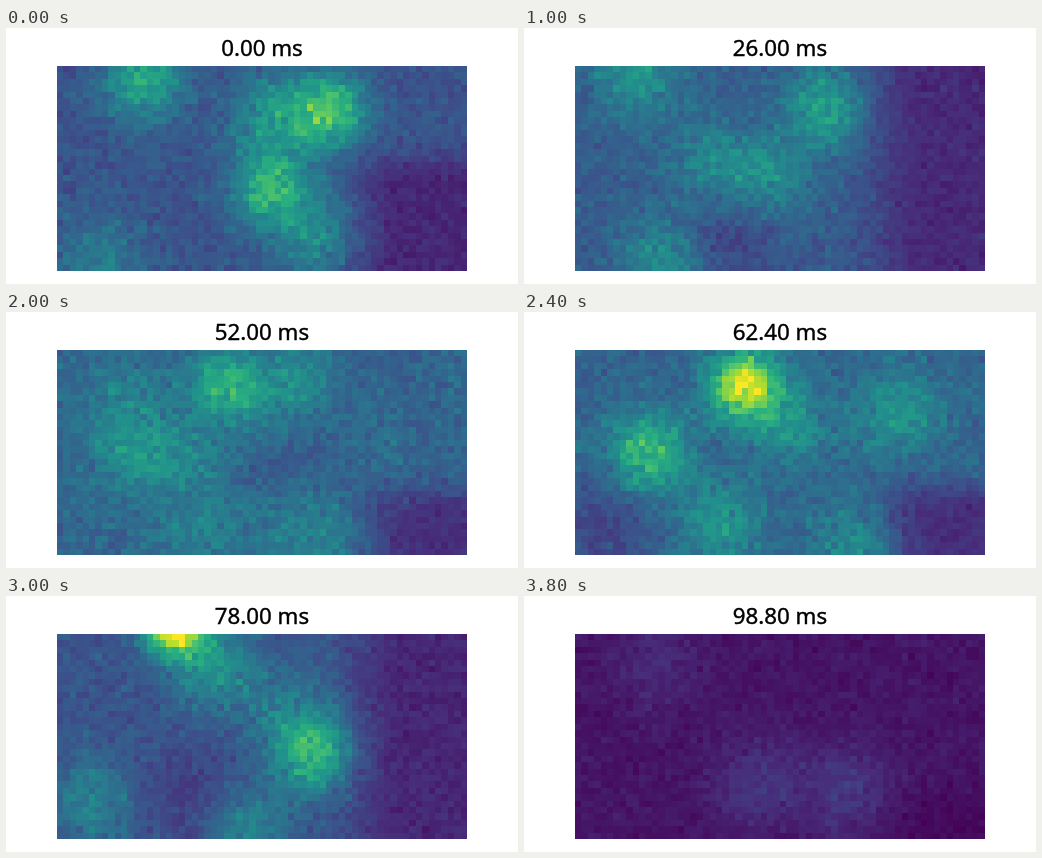
These frames come from a looping animation (512x256 px, 4000 ms). An HTML page with a canvas:

```html
<!DOCTYPE html>
<html lang="en">
<head>
<meta charset="utf-8">
<title>Activity map</title>
<style>
  html, body { margin: 0; width: 100%; height: 100%; overflow: hidden; background: #fff; }
  svg { position: absolute; left: 0; top: 0; }
  text {
    font: 22.3px "Noto Sans", "Open Sans", sans-serif; text-anchor: middle;
    fill: #000; stroke: #000; stroke-width: .4px;
  }
  canvas {
    position: absolute; left: 51px; top: 38px;
    width: 410px; height: 205px; image-rendering: pixelated;
  }
</style>
</head>
<body>
<svg width="512" height="256"><text id="label" x="256" y="28">0.00 ms</text></svg>
<canvas id="map" width="64" height="32"></canvas>
<script>
const COLS = 64, ROWS = 32, STEPS = 20, STEP_MS = 200, UNIT = 5.2;
const STOPS = ['440154', '472d7b', '3b528b', '2c728e', '21918c', '28ae80', '5ec962', 'addc30', 'fde725']
  .map(h => [0, 2, 4].map(i => parseInt(h.slice(i, i + 2), 16)));

const clamp = v => Math.max(0, Math.min(1, v));
const ramp = (v, from, to) => {
  const t = clamp((v - from) / (to - from));
  return t * t * (3 - 2 * t);
};

// A spot fades out around its centre; brighter spots are tighter.
const spot = (x, y, gain) => {
  const r = 5 - 2 * gain;
  return (cx, cy) => gain * Math.exp(-((cx - x) ** 2 + (cy - y) ** 2) / (2 * r * r));
};

// An even level, dimmed on the right below the row `top`, with spots on it.
const pose = (step, level, top, ...spots) => ({
  step,
  at: (x, y) => level * (1 - .6 * ramp(x, 40, 54) * ramp(y, top, top + 8))
    + spots.reduce((sum, s) => sum + s(x, y), 0)
});

const poses = [
  pose(0, .26, 10, spot(13, 2, .32), spot(33, 7, .24), spot(42, 6.5, .44),
    spot(33, 18.5, .4), spot(40, 26, .2), spot(6, 30, .16)),
  pose(2, .27, 15, spot(20, 3, .26), spot(30, 15, .32), spot(7, 11, .14),
    spot(44, 6, -.17), spot(15, 18, -.15), spot(20, 30, .18)),
  pose(5, .29, -8, spot(9, 1, .23), spot(38, 6, .27), spot(29, 17, .2),
    spot(20, 14, .14), spot(13, 30, .2), spot(24, 27, -.1)),
  pose(8, .34, 18, spot(10, 7, .18), spot(37, 4, .3), spot(20, 16, .22),
    spot(34, 15, -.19), spot(50, 7, -.17), spot(36, 27, .18), spot(5, 27, .14)),
  pose(12, .32, 17, spot(26, 5, .63), spot(11, 15.5, .36), spot(33, 11, .17),
    spot(50, 9, .19), spot(22, 27, .2), spot(44, 30, .19), spot(4, 27, -.12)),
  pose(15, .26, -8, spot(18, -2, .9), spot(24, 5, .24), spot(39.5, 18, .4),
    spot(35, 11, .12), spot(5, 26, .18), spot(29, 30, .19), spot(20, 25, -.09)),
  pose(19, .055, 20, spot(28, 23, .1), spot(42, 24, .11), spot(12, 4, .06))
];

function random(seed) {
  let s = seed * 7919 + 17;
  return () => {
    s = (s + 0x6D2B79F5) | 0;
    let t = Math.imul(s ^ (s >>> 15), 1 | s);
    t = (t + Math.imul(t ^ (t >>> 7), 61 | t)) ^ t;
    return ((t ^ (t >>> 14)) >>> 0) / 4294967296;
  };
}

function color(v) {
  const p = Math.min(.9999, clamp(v)) * (STOPS.length - 1), k = Math.floor(p);
  return STOPS[k].map((c, i) => c + (STOPS[k + 1][i] - c) * (p - k));
}

function makeImage(step) {
  const n = Math.max(1, poses.findIndex(p => p.step >= step));
  const a = poses[n - 1], b = poses[n];
  const mix = (step - a.step) / (b.step - a.step);
  const rnd = random(step + 1);
  const image = new ImageData(COLS, ROWS);
  for (let i = 0; i < COLS * ROWS; i++) {
    const x = i % COLS, y = Math.floor(i / COLS);
    const v = a.at(x, y) * (1 - mix) + b.at(x, y) * mix;
    const grain = (rnd() + rnd() + rnd() - 1.5) * 2;
    image.data.set([...color(v + grain * (.012 + .065 * Math.max(0, v))), 255], i * 4);
  }
  return image;
}

const images = Array.from({ length: STEPS }, (_, i) => makeImage(i));
const ctx = document.getElementById('map').getContext('2d');
const label = document.getElementById('label');
const start = performance.now();
let shown = -1;

function draw() {
  const step = Math.floor((performance.now() - start) / STEP_MS) % STEPS;
  if (step !== shown) {
    shown = step;
    ctx.putImageData(images[step], 0, 0);
    label.textContent = (step * UNIT).toFixed(2) + ' ms';
  }
  requestAnimationFrame(draw);
}
draw();
</script>
</body>
</html>
```
